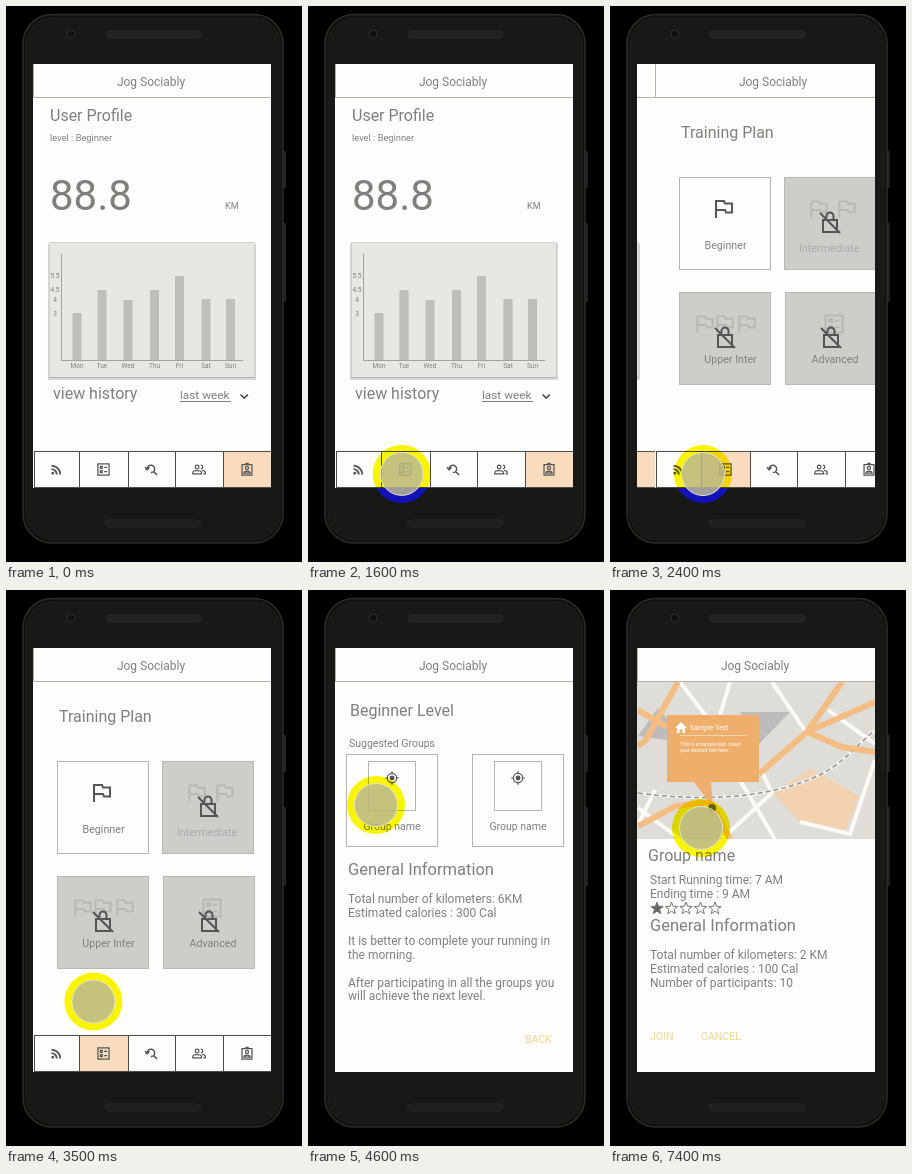
Animation of 296x556 px, one loop 8000 ms. Source, as an HTML page:

```html
<!DOCTYPE html>
<html lang="en">
<head>
<meta charset="utf-8">
<title>Running app walkthrough</title>
<style>
  html, body { margin: 0; width: 100%; height: 100%; overflow: hidden; background: #000; }
  svg { display: block; width: 296px; height: 556px; font-family: Roboto, sans-serif; }
  text { fill: #7f7f7c; }
  .icon { fill: none; stroke: #555553; stroke-width: 2; }
  .gold { fill: #ead891; }
  .mid { text-anchor: middle; }
  .white { fill: #fff; }
  .faint { fill: #aaaaac; }
  #glow { mix-blend-mode: multiply; }
</style>
</head>
<body>
<svg id="stage" viewBox="0 0 296 556"></svg>
<script>
const LOOP = 8000, STEP = 100, LEFT = 27, WIDTH = 238;

const text = (x, y, size, str, cls = '') =>
  `<text x="${x}" y="${y}" font-size="${size}" class="${cls}">${str}</text>`;
const rect = (x, y, w, h, fill, more = '') =>
  `<rect x="${x}" y="${y}" width="${w}" height="${h}" fill="${fill}" ${more}/>`;
const path = (d, stroke, width = 1, more = '') =>
  `<path d="${d}" fill="none" stroke="${stroke}" stroke-width="${width}" ${more}/>`;
const box = (x, y, w, h, fill = 'none', stroke = '#b4b4ae') =>
  rect(x + .5, y + .5, w, h, fill, `stroke="${stroke}"`);
const lines = (x, size, rows) => rows.map(([y, str]) => text(x, y, size, str)).join('');

// Icons live on a 24-unit grid.
const icons = {
  feed: '<circle cx="6" cy="18" r="1.4"/><path d="M4 5.9a14 14 0 0 1 14 14M4 11.5a8.5 8.5 0 0 1 8.5 8.5" stroke-width="3"/>',
  plan: '<path d="M3 3h18v18H3zM7 7h3v3H7zM7 14h3v3H7zM13 8.5h5M13 15.5h5"/>',
  search: '<path d="M5 11a6 6 0 1 1 6 6M15 15l6 6M1.5 8.5l3.5 4 3.5-4" stroke-width="2.4"/>',
  people: '<circle cx="9" cy="8" r="3"/><path d="M2 19v-2c0-2 4-3.2 7-3.2s7 1.2 7 3.2v2zM15 5a3 3 0 0 1 0 6M17 13.5c3 .5 5 1.5 5 3.5v2h-3"/>',
  profile: '<path d="M4 4h16v17H4zM9 4l1.5-2h3L15 4M7 18c0-2.5 2.5-3.5 5-3.5s5 1 5 3.5z"/><circle cx="12" cy="9.5" r="2.5"/>',
  flag: '<path d="M4 21V4h8l1 2.5h7v9h-6l-1-2.5H4"/>',
  lock: '<path d="M5 10h14v12H5zM8.5 8V6a3.5 3.5 0 0 1 7 0v4M2 3l20 20"/>',
  target: '<circle cx="12" cy="12" r="7.5"/><circle cx="12" cy="12" r="3" fill="#555553"/><path d="M12 1v4M12 19v4M1 12h4M19 12h4"/>'
};
const icon = (name, x, y, scale = 1, more = '') =>
  `<g class="icon" transform="translate(${x - 12 * scale} ${y - 12 * scale}) scale(${scale})" ${more}>${icons[name]}</g>`;

const nav = active => {
  const edges = [28, 73, 122, 169, 217, 265];
  const names = ['feed', 'plan', 'search', 'people', 'profile'];
  return names.map((name, i) => {
    const [left, right] = [edges[i], edges[i + 1]];
    return box(left, 445, right - left, 36, i === active ? '#f8dcbd' : '#fdfdfb', '#4b4b48') +
      icon(name, (left + right) / 2, 463.5, .62);
  }).join('');
};

const page = (id, content) => `<g id="${id}">${rect(LEFT, 58, WIDTH, 424, '#fdfdfb')}` +
  path('M27.5 58V91.5H265', '#b2b2a8') + text(145, 80, 12, 'Jog Sociably', 'mid') + content + '</g>';

function profilePage() {
  const days = [['Mon', 71, 307], ['Tue', 96, 284], ['Wed', 122, 294], ['Thu', 148.5, 284],
    ['Fri', 173.5, 270], ['Sat', 200, 293], ['Sun', 224.5, 293]];
  const bars = days.map(([day, x, top]) =>
    rect(x - 4.5, top, 9, 354 - top, '#bebebb') + text(x, 362, 6.5, day, 'mid')).join('');
  const marks = [['5.5', 272], ['4.5', 286], ['4', 296], ['3', 310]]
    .map(([n, y]) => text(49, y, 6.5, n, 'mid')).join('');
  return page('profile',
    text(44, 115, 16, 'User Profile') + text(44, 135, 9.3, 'level : Beginner') +
    text(44, 204, 42, '88.8') + text(219, 203, 9, 'KM') +
    rect(42, 238, 208, 136, '#d6d6d4') + box(43, 236, 205, 135, '#e7e7e4', '#d0d0cc') +
    path('M43 371.5H249', '#b2b2ae') +
    bars + marks + path('M55.5 248V354.5H237', '#a2a29c') +
    text(47, 393, 16, 'view history') + text(174, 393, 11.8, 'last week') +
    path('M174 395.5H225', '#7f7f7c') + path('M234.5 388.5l3.7 3.5 3.7-3.5', '#333', 1.3) +
    nav(4));
}

function planPage() {
  const locked = (x, y, label, labelX, labelY, cls, ghosts) =>
    box(x, y, 91, 92, '#cdcdca', '#b8b8b4') +
    ghosts.map(([name, gx]) => icon(name, gx, y + 32, .95, 'opacity=".18"')).join('') +
    text(labelX, labelY, 10.7, label, 'mid ' + cls) + icon('lock', x + 46, y + 45);
  return page('plan',
    text(53, 132, 16, 'Training Plan') +
    box(51, 171, 91, 92) + icon('flag', 96, 203) + text(97.5, 242.5, 10.7, 'Beginner', 'mid') +
    locked(156, 171, 'Intermediate', 201, 246, 'faint', [['flag', 191], ['flag', 219]]) +
    locked(51, 286, 'Upper Inter', 102.5, 357, '', [['flag', 77], ['flag', 97], ['flag', 119]]) +
    locked(157, 286, 'Advanced', 207, 357, '', [['plan', 206]]) +
    nav(1));
}

function levelPage() {
  const group = x => box(x, 164, 91, 92) + box(x + 22, 171, 47, 49) +
    icon('target', x + 46, 188, .62) + text(x + 46, 239.5, 10.5, 'Group name', 'mid');
  return page('level',
    text(42, 126, 16, 'Beginner Level') + text(41, 157, 10.5, 'Suggested Groups') +
    group(38) + group(164) + text(40, 285, 16.5, 'General Information') +
    lines(40, 12, [
      [313, 'Total number of kilometers: 6KM'], [327, 'Estimated calories : 300 Cal'],
      [355, 'It is better to complete your running in'], [369, 'the morning.'],
      [397, 'After participating in all the groups you'], [410, 'will achieve the next level.']]) +
    text(217, 453, 10.6, 'BACK', 'gold'));
}

function streetMap() {
  const popup = 'M57 125H149V192H101L103 217L84 192H57Z';
  const rail = 'M28 203C95 212 150 207 190 193S236 165 265 140';
  return `<g clip-path="url(#map)">` + rect(LEFT, 92, WIDTH, 157, '#dfddd8') +
    '<path d="M162 203L201 179L249 206L236 240L190 232Z" fill="#f2d2b0"/>' +
    '<path d="M28 146L48 118L57 128V150ZM130 122H180L149 154Z" fill="#bdbcba"/>' +
    path('M70 92L96 126M120 92L110 125M162 92L196 142M28 218L70 249M45 200L28 235' +
      'M112 249L162 203L151 180M130 190L165 249M190 232L240 244L265 170M218 120L265 154',
      '#fbfaf7', 4) +
    path(rail, '#f6f5f2', 3) + path(rail, '#96959a', 1.5, 'stroke-dasharray="5 3"') +
    path('M68 92L36 150L28 156M28 120L57 137M28 236L66 216L101 212M120 249L101 212' +
      'M232 92L197 142L149 184M197 142L232 157L265 162M197 142L265 112', '#f3bd83', 6) +
    `<path d="${popup}" fill="#f0ae6c"/><circle cx="102" cy="218" r="4" fill="#66646c"/>` +
    '<path d="M65 138L71 132L77 138H75V143H72.5V139.5H69.5V143H67V138Z" class="white"/>' +
    text(80, 140, 7, 'Sample Text', 'white') + path('M70 145.5H137', '#f7d3ac') +
    text(70, 156, 5, 'This is a sample text. Insert', 'white') +
    text(70, 162, 5, 'your desired text here.', 'white') + '</g>';
}

function star(cx, cy, filled) {
  const points = Array.from({ length: 10 }, (_, i) => {
    const r = i % 2 ? 2.7 : 6.5, a = i * Math.PI / 5;
    return `${cx + r * Math.sin(a)},${cy - r * Math.cos(a)}`;
  });
  return `<polygon points="${points.join(' ')}" fill="${filled ? '#666' : 'none'}" stroke="#777"/>`;
}

const groupPage = () => page('group',
  streetMap() + text(38, 271, 16, 'Group name') +
  lines(40, 12, [[294, 'Start Running time: 7 AM'], [308, 'Ending time : 9 AM']]) +
  [0, 1, 2, 3, 4].map(i => star(47 + i * 14.5, 318.5, i === 0)).join('') +
  text(40, 341, 16.5, 'General Information') +
  lines(40, 12, [[369, 'Total number of kilometers: 2 KM'],
    [383, 'Estimated calories : 100 Cal'], [397, 'Number of participants: 10']]) +
  text(40, 450, 10.6, 'JOIN', 'gold') + text(91, 450, 10.6, 'CANCEL', 'gold'));

const phone = () =>
  rect(276, 145, 4, 37, '#212120', 'rx="1"') + rect(276, 217, 4, 79, '#212120', 'rx="1"') +
  rect(17, 8.5, 260, 528.5, '#111110', 'rx="29" stroke="#2c2c2a" stroke-width="1.5"') +
  rect(20, 12, 254, 521.5, '#181817', 'rx="26" stroke="#1e1e1c"') +
  '<circle cx="65" cy="28" r="4" fill="#111" stroke="#2d2d2b"/>' +
  rect(100, 25, 95, 7, '#222220', 'rx="3.5" stroke="#292927"') +
  rect(99, 514, 96, 7, '#1f1f1e', 'rx="3.5" stroke="#262624"');

const stage = document.getElementById('stage');
stage.innerHTML =
  `<defs><clipPath id="screen">${rect(LEFT, 58, WIDTH, 424, '#fff')}</clipPath>` +
  `<clipPath id="map">${rect(LEFT, 92, WIDTH, 157, '#fff')}</clipPath></defs>` +
  rect(0, 0, 296, 556, '#000') + phone() +
  '<circle class="cursor" r="29" fill="#1312b8"/>' +
  '<g clip-path="url(#screen)">' + profilePage() + planPage() + levelPage() + groupPage() +
  '<circle class="cursor" id="glow" r="29" fill="#fbf700"/></g>' +
  '<circle class="cursor" r="21.5" fill="#bcb996" fill-opacity=".84" stroke="#e4e3c8"/>';

const el = id => document.getElementById(id);
const cursors = stage.querySelectorAll('.cursor');

const progress = (t, start, end) => Math.min(1, Math.max(0, (t - start) / (end - start)));

// A hand movement: soft start, and a tail that lengthens with the power.
function glide(p, power) {
  const q = 1 - (1 - p) ** power;
  return q * q * (3 - 2 * q);
}

// The CSS "ease" curve, cubic-bezier(.25, .1, .25, 1).
function ease(p) {
  let low = 0, high = 1, s = .5;
  for (let i = 0; i < 20; i++) {
    if (.75 * s * (1 - s) + s ** 3 < p) low = s; else high = s;
    s = (low + high) / 2;
  }
  return .3 * s * (1 - s) ** 2 + 3 * s * s * (1 - s) + s ** 3;
}

const moves = [
  { start: 300, end: 1700, dx: -237, dy: 38, px: 1.3, py: 1.3 },
  { start: 3400, end: 4000, dx: -25, dy: -253, px: 2, py: 2 },
  { start: 6200, end: 6600, dx: 23, dy: 23, px: 1, py: 2 }
];

function draw(t) {
  let x = 330, y = 430;
  for (const m of moves) {
    const p = progress(t, m.start, m.end);
    x += m.dx * glide(p, m.px);
    y += m.dy * glide(p, m.py);
  }
  cursors.forEach(c => c.setAttribute('transform', `translate(${x} ${y})`));

  const slide = Math.round(WIDTH * ease(progress(t, 1800, 2700)));
  el('profile').setAttribute('transform', `translate(${-slide} 0)`);
  el('plan').setAttribute('transform', `translate(${WIDTH - slide} 0)`);
  el('level').setAttribute('opacity', ease(progress(t, 4100, 4600)));
  el('group').setAttribute('opacity', ease(progress(t, 6700, 7400)));
}

function tick() {
  draw(Math.floor(performance.now() % LOOP / STEP) * STEP);
  requestAnimationFrame(tick);
}
tick();
</script>
</body>
</html>
```
